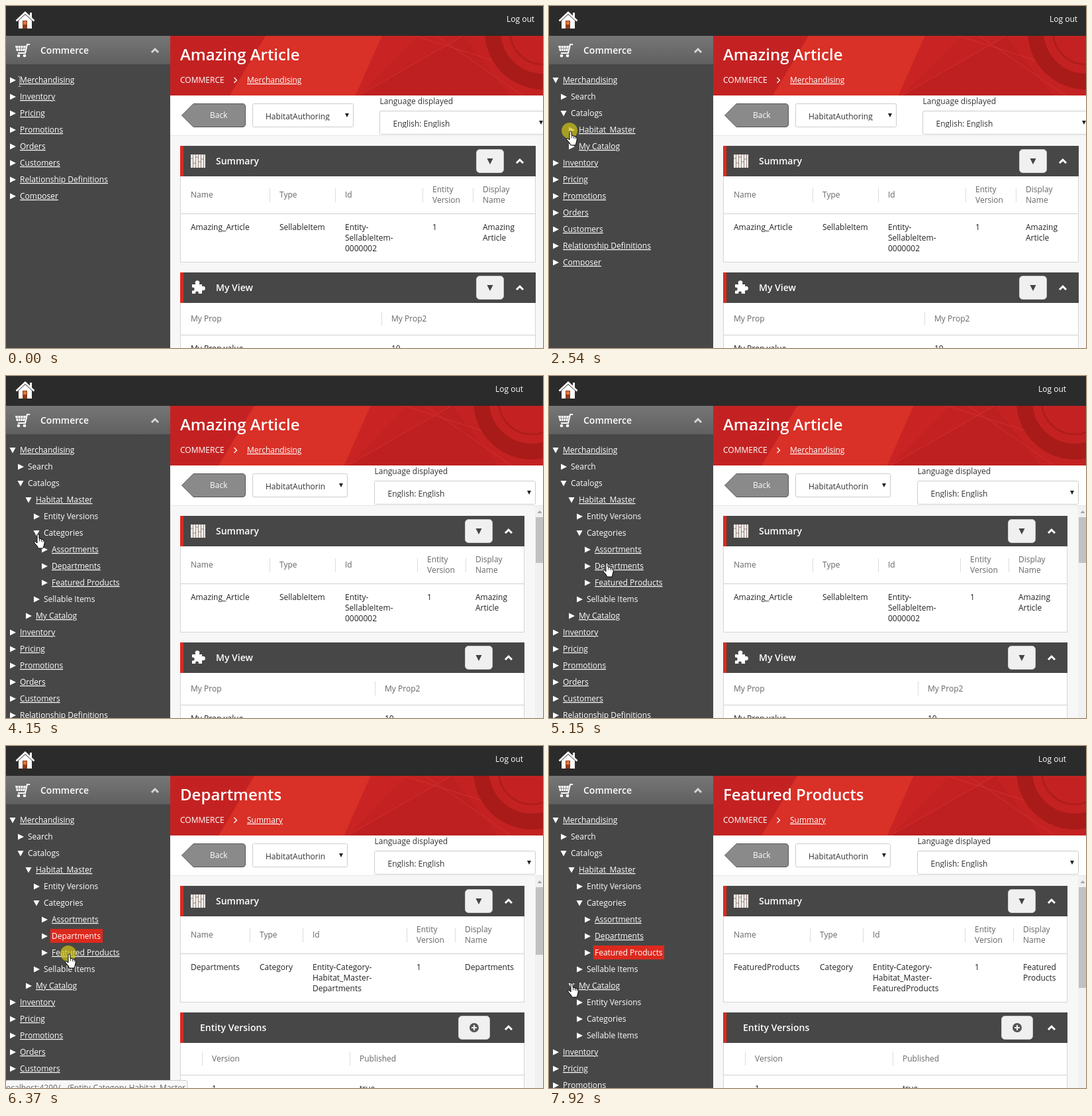
Recreate the animation shown at these times as an HTML page. Size 811 px wide and 516 px high, loop 8 s.

```html
<!DOCTYPE html>
<html lang="en">
<head>
<meta charset="utf-8">
<style>
html, body { margin: 0; width: 100%; height: 100%; overflow: hidden; background: #f7f7f7; }
svg { display: block; font: 12px "Open Sans", sans-serif; }
</style>
</head>
<body>
<svg id="stage" width="811" height="516" viewBox="0 0 811 516"></svg>
<script>
const stage = document.getElementById('stage');
const LOOP = 8000;
const LOADS = [[5460, 5840], [6460, 6860]];

// Tree: node(name, time it opens, children)
const node = (name, open = Infinity, kids = []) => ({ name, open, kids });
const leaves = (...names) => names.map(n => node(n));
const PLAIN = ['Search', 'Catalogs', 'Entity Versions', 'Categories', 'Sellable Items'];
const TREE = [
  node('Merchandising', 620, [
    node('Search'),
    node('Catalogs', 1620, [
      node('Habitat_Master', 2850, [
        node('Entity Versions'),
        node('Categories', 4150, leaves('Assortments', 'Departments', 'Featured Products')),
        node('Sellable Items')
      ]),
      node('My Catalog', 7830, leaves('Entity Versions', 'Categories', 'Sellable Items'))
    ])
  ]),
  ...leaves('Inventory', 'Pricing', 'Promotions', 'Orders', 'Customers', 'Relationship Definitions', 'Composer')
];
// Selected rows: from, until, underlined until, width
const ACTIVE = {
  'Departments': [5460, 6460, 5840, 79],
  'Featured Products': [6460, LOOP, 6950, 107]
};

const PAGES = [
  { title: 'Amazing Article', crumb: 'Merchandising', cols: [279, 413, 512, 636, 709], wideCols: [279, 413, 512, 644, 720],
    row: ['Amazing_Article', 'SellableItem', 'Entity-|SellableItem-|0000002', '1', 'Amazing|Article'], thumb: 282 },
  { title: 'Departments', crumb: 'Summary', cols: [279, 383, 463, 620, 693],
    row: ['Departments', 'Category', 'Entity-Category-|Habitat_Master-|Departments', '1', 'Departments'], thumb: 315 },
  { title: 'Featured Products', crumb: 'Summary', cols: [279, 409, 489, 643, 716],
    row: ['FeaturedProducts', 'Category', 'Entity-Category-|Habitat_Master-|FeaturedProducts', '1', 'Featured|Products'], thumb: 315 }
];

// Cursor moves: start, end, steps, x, y, ease power
const MOVES = [
  [90, 300, 4, 10, 114, 2], [870, 1470, 9, 21, 161, 2.5], [2180, 2390, 4, 30, 187, 2],
  [2540, 2541, 1, 31, 188, 1], [3400, 4000, 9, 47, 238, 4], [4700, 5150, 7, 86, 281, 2],
  [5760, 6000, 4, 99, 322, 2], [6150, 6210, 2, 94, 313, 1], [6860, 7460, 9, 33, 357, 2.5]
];
const CLICKS = [[300, 460], [1470, 1620], [2540, 2700], [4000, 4150], [5310, 5460], [6370, 6460], [7610, 7670]];

const within = (t, [a, b]) => t >= a && t < b;
const rect = (x, y, w, h, fill, more = '') => `<rect x="${x}" y="${y}" width="${w}" height="${h}" fill="${fill}" ${more}/>`;
const path = (d, fill, more = '') => `<path d="${d}" fill="${fill}" ${more}/>`;
const line = (d, stroke, width = 1) => path(d, 'none', `stroke="${stroke}" stroke-width="${width}"`);
const text = (x, y, s, fill = '#fff', more = '') => `<text x="${x}" y="${y}" fill="${fill}" ${more}>${s}</text>`;
const bold = size => `font-size="${size}" font-weight="600"`;
const UNDER = 'text-decoration="underline"';
const down = (x, y, fill = '#222', s = 3) => path(`M${x - s} ${y - s}h${2 * s}l${-s} ${2 * s}z`, fill);
const chevron = (x, y, stroke) => line(`M${x - 5} ${y + 3}l5 -5l5 5`, stroke, 3);
const lines = (x, y, s, fill) => s.split('|').map((l, i) => text(x, y + i * 16, l, fill)).join('');
const clip = (x, y, w, h, body) => `<svg x="${x}" y="${y}" width="${w}" height="${h}" viewBox="${x} ${y} ${w} ${h}">${body}</svg>`;

function sidebar(t) {
  let s = rect(0, 45, 248, 471, '#474747') + rect(0, 45, 248, 43, 'url(#bar)')
    + line('M36 58h-4l-3 13h-11', '#fff', 2) + path('M14 60h16l-2 8h-12z', '#fff')
    + line('M18 60l1 8M22 60v8M26 60l-1 8M15 64h14', '#6c6c6c', .8)
    + '<g fill="#fff"><circle cx="19" cy="75" r="2.3"/><circle cx="28" cy="75" r="2.3"/></g>'
    + text(52, 72, 'Commerce', '#fff', bold(14)) + chevron(225, 67, '#d5d5d5');
  let y = 112;
  const walk = (list, level) => list.forEach(n => {
    const x = 21 + 12 * level, open = t >= n.open, sel = ACTIVE[n.name];
    const on = sel && within(t, sel);
    const under = on ? t < sel[2] : !PLAIN.includes(n.name);
    if (on) s += rect(x - 2, y - 11, sel[3], 21, '#dc291e');
    s += open ? path(`M${x - 15.5} ${y - 4}h9l-4.5 8.5z`, '#fff') : path(`M${x - 15} ${y - 4.5}l9 4.5l-9 4.5z`, '#fff');
    s += text(x, y + 4, n.name, '#fff', under ? UNDER : '');
    y += 25;
    if (open) walk(n.kids, level + 1);
  });
  walk(TREE, 0);
  return s;
}

function topBar(shift) {
  return rect(0, 0, 811, 45, '#2b2b2b') + rect(36, 10, 3, 7, '#fff')
    + path('M19 22l10 -9l10 9v12h-20z', '#fff') + line('M15.5 22.5l13.5 -12.5l13.5 12.5', '#fff', 2.8)
    + rect(25, 22, 7, 12, '#8e3c1c') + rect(26, 23, 5, 5, '#e0763a')
    + text(756 + shift, 24, 'Log out');
}

function banner(page, shift) {
  const art = path('M392 45H568L528 135H338z', '#d93027')
    + path('M568 45H622L533 135H528z', '#c92423')
    + path('M690 45L533 135H760z', '#be1f20')
    + line('M618 45L830 112M690 45L533 135M650 45L780 135', '#d0302d')
    + '<circle cx="811" cy="38" r="76" fill="none" stroke="#a81b18" stroke-width="24"/>'
    + '<circle cx="811" cy="38" r="50" fill="none" stroke="#b01d1b" stroke-width="3"/>';
  return clip(248, 45, 563, 90, rect(248, 45, 563, 90, '#c42222') + `<g transform="translate(${shift} 0)">${art}</g>`)
    + text(263, 82, page.title, '#fff', bold(24))
    + text(263, 116, 'COMMERCE') + line('M344.500 108l4 4l-4 4', '#fff', 1.3)
    + text(364, 116, page.crumb, '#fff', UNDER);
}

function toolbar(wide) {
  const w = wide ? 153 : 144, x = wide ? 564 : 556;
  const box = (bx, by, bw) => rect(bx + .5, by + .5, bw - 1, 35, '#fff', 'rx="2" stroke="#ccc"');
  return rect(248, 135, 563, 61, '#fff') + rect(248, 195, 563, 1, '#e6e6e6')
    + path('M265.500 165L283 147.500H357Q361.500 147.500 361.500 152V178Q361.500 182.500 357 182.500H283z', '#8a8a8a', 'stroke="#555"')
    + text(308, 169, 'Back')
    + box(372, 147, w) + clip(392, 150, w - 54, 23, text(392, 171, 'HabitatAuthoring', '#333')) + down(372 + w - 10, 165)
    + text(x + .5, 148, 'Language displayed', '#333')
    + box(x, 158, wide ? 253 : 244) + clip(x + 20, 165, 150, 19, text(x + 20.5, 182, 'English: English', '#333'))
    + down(wide ? 808 : 790, 176);
}

function panel(y, h, right, title, titleX, plus) {
  const bw = plus ? 48 : 42, bx = right - (plus ? 100 : 90), cx = bx + bw / 2, cy = y + 23;
  return rect(263.5, y + .5, right - 264, h, '#fff', 'stroke="#d5d5d5"')
    + rect(263, y, right - 263, 46, '#474747') + rect(263, y, 5, 46, '#dc291e')
    + text(titleX, y + 28, title, '#fff', bold(14))
    + rect(bx + .5, y + 5.5, bw - 1, 35, '#f0f0f0', 'rx="5" stroke="#ccc"')
    + (plus ? `<circle cx="${cx}" cy="${cy}" r="7" fill="#555"/>` + line(`M${cx - 4} ${cy}h8M${cx} ${cy - 4}v8`, '#f0f0f0', 2.2)
            : down(cx, cy + .5, '#444', 4.5))
    + chevron(right - 24, cy, '#fff');
}

const divider = (x, y) => rect(x, y, 1, 21, '#ddd');

function panels(page, wide) {
  const right = wide ? 800 : 783, first = page === PAGES[0];
  const cols = wide && page.wideCols || page.cols;
  let s = panel(211, 175, right, 'Summary', 317) + rect(264, 313, right - 265, 1, '#d0d0d0')
    + rect(279, 224, 22, 20, '#f4efec')
    + line('M282.500 224v20M286.500 224v20M290.500 224v20M294.500 224v20M298.500 224v20M279 230h3M283 237h4M287 228h4M291 235h4M295 231h4', '#8b7770', .9);
  ['Name', 'Type', 'Id', 'Entity|Version', 'Display|Name'].forEach((h, i) => {
    const x = cols[i];
    if (i) s += divider(x - 15, 275);
    s += lines(x, h.includes('|') ? 281 : 289, h, '#666') + lines(x, 338, page.row[i], '#222');
  });
  s += panel(402, 130, right, first ? 'My View' : 'Entity Versions', first ? 317 : 293, !first)
    + rect(264, 496, right - 265, 1, '#d0d0d0');
  if (first) s += rect(281, 420, 15, 14, '#fff') + '<g fill="#fff"><circle cx="289" cy="417.500" r="3.300"/><circle cx="297.500" cy="426" r="3.300"/></g>'
    + '<g fill="#474747"><circle cx="282" cy="427" r="2.600"/><circle cx="288.500" cy="433" r="2.400"/></g>';
  const x2 = first ? (wide ? 582 : 572) : 534, x1 = first ? 279 : 311;
  if (!first) s += divider(296, 461);
  return s + divider(x2 - 15, 461)
    + text(x1, 476, first ? 'My Prop' : 'Version', '#666') + text(x2, 476, first ? 'My Prop2' : 'Published', '#666')
    + text(x1, 521, first ? 'My Prop value' : '1', '#222') + text(x2, 521, first ? '10' : 'true', '#222');
}

function cursorAt(t) {
  let x = 20, y = 113;
  for (const [a, b, n, tx, ty, pow] of MOVES) {
    if (t < a) break;
    const step = Math.min(n, Math.floor((t - a) / (b - a) * Math.max(1, n - 1) + 1e-6) + 1);
    const p = 1 - (1 - step / n) ** pow;
    x += (tx - x) * p;
    y += (ty - y) * p;
  }
  return [Math.round(x), Math.round(y)];
}

function cursor(t) {
  const [x, y] = cursorAt(t);
  if (t < 90) return line('M18 106.500h2l.5 1l.5 -1h2M20.500 107v13M18 121.500h2l.5 -1l.5 1h2', '#aaa');
  const dot = CLICKS.some(c => within(t, c)) ? `<circle cx="${x}" cy="${y}" r="12" fill="#d0c314" opacity=".7"/>` : '';
  return dot + `<g transform="translate(${x - 5} ${y})">`
    + path('M5 1.500Q6.500 0 8 1.500V7L14 9Q16.500 10 16.300 13L15.500 17L14 22H6.500L5.500 19L1 14Q0 12 2 11.500L5 14z', '#fff', 'stroke="#000"')
    + line('M8.500 7.500v4M11.500 8.500v3.500M14 9.500v3', '#000', .8) + '</g>';
}

const scrollbar = bottom => rect(799, 196, 12, 320, '#f1f1f1') + rect(800, 213, 11, bottom - 213, '#c1c1c1')
  + path('M802.500 207h7l-3.500 -4z', '#a3a3a3');

const status = rect(-1, 504.5, 275, 20, '#f8f8f8', 'rx="3" stroke="#ccc"')
  + text(-3, 520, 'localhost:4200/…/Entity-Category-Habitat_Master…', '#666');

const defs = '<defs><linearGradient id="bar" x2="0" y2="1"><stop stop-color="#767676"/><stop offset="1" stop-color="#606060"/></linearGradient></defs>';

function scene(t) {
  const loading = LOADS.some(l => within(t, l));
  const page = PAGES[LOADS.filter(l => t >= l[1]).length];
  const wide = t < 4150 || loading, shift = wide ? 0 : -17;
  return defs + rect(248, 135, 563, 381, '#f7f7f7')
    + (loading ? '' : panels(page, wide))
    + toolbar(wide) + banner(page, shift)
    + (wide ? '' : scrollbar(t >= 7830 ? 365 : page.thumb))
    + sidebar(t) + topBar(shift)
    + (within(t, [5310, 6950]) ? status : '') + cursor(t);
}

let last = '';
function draw() {
  const now = scene(performance.now() % LOOP);
  if (now !== last) stage.innerHTML = last = now;
  requestAnimationFrame(draw);
}
draw();
</script>
</body>
</html>
```
